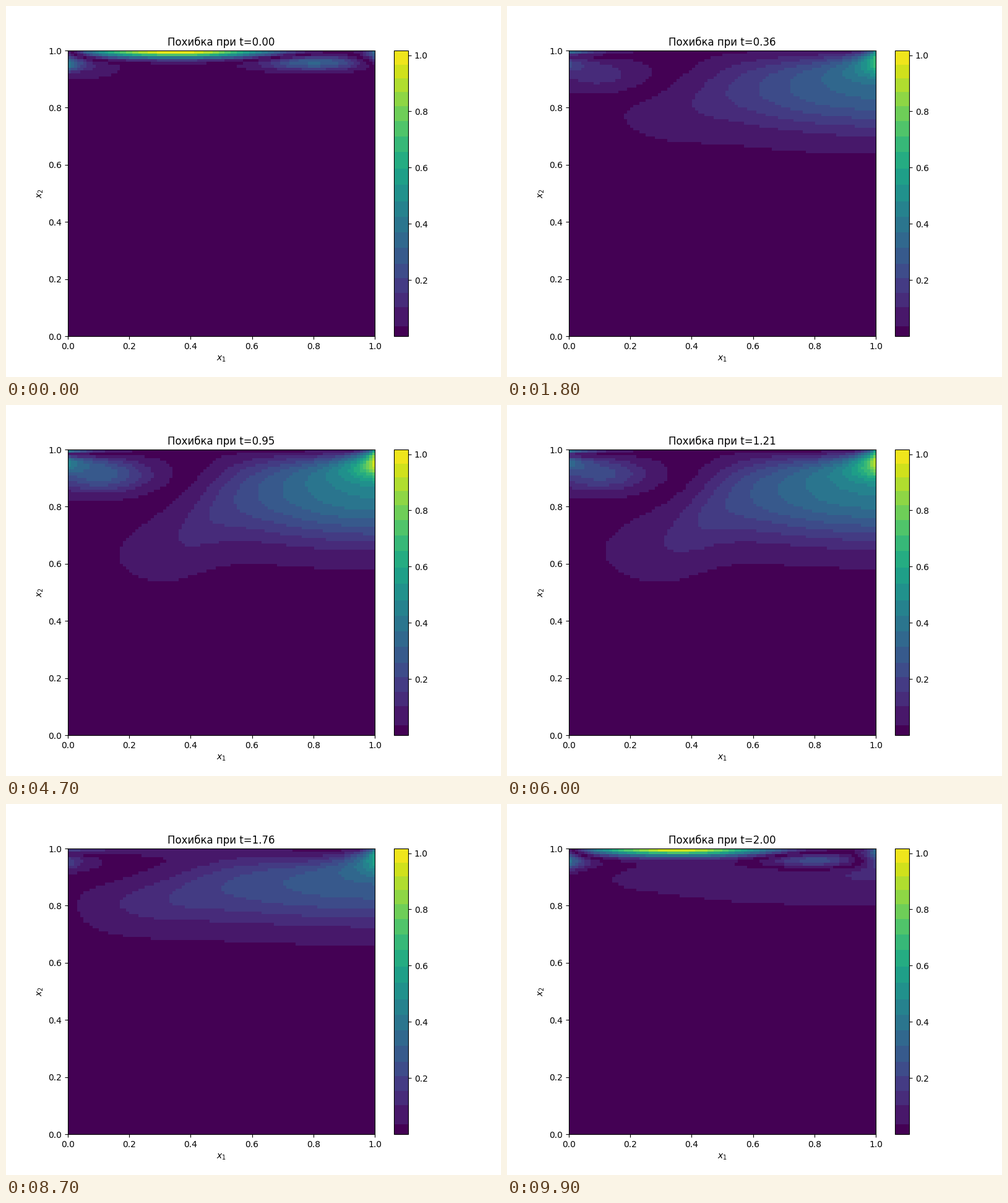
Recreate the animation shown at these times as a matplotlib script. Size 800 px wide and 600 px high, loop 10 s.

```python
import numpy as np
import matplotlib.pyplot as plt
from matplotlib.animation import FuncAnimation
from matplotlib.colors import ListedColormap

FRAMES, CELLS = 100, 100
T_END = 2.0
VMIN, VMAX = 0.0002, 1.0165

centres = (np.arange(CELLS) + .5) / CELLS
x, depth = np.meshgrid(centres, centres)   # depth runs down from x2 = 1


def bell(u, centre, width):
    return np.exp(-((u - centre) / width) ** 2)


def error(i):
    """Absolute error: a few lobes that grow and fade below the top edge."""
    t = T_END * i / (FRAMES - 1)
    swell = np.sin(np.pi * i / FRAMES) ** .35
    start, left = np.exp(-t / .04), T_END - t
    skin = np.exp(-depth / .03)

    # Broad lobe on the right with a tail that sinks towards the left
    reach = .2 + .24 * swell
    tail = 1 / (1 + np.exp((x - .42) / .07))
    spread = .5 + .6 * (t / T_END) ** 4 + .25 * np.exp(-t / .25)
    lobe = (.43 * swell ** 1.2 * bell(x, 1, spread) * np.tanh((x + .03) / .12)
            * bell(depth, .33 * reach + .23 * swell ** 4 * tail,
                   (.4 - .1 * tail) * reach)
            * (1 - (1 - np.exp(-t / .3)) * skin))

    # Peak in the right corner
    corner = ((.42 + .35 * swell ** 4) * np.exp((x - 1) / (.025 + depth))
              * bell(depth, .035 * swell, .05 + .012 * swell))

    # Thin top layer and the lobe of opposite sign under it
    layer = start + .95 * np.exp(-left / .1)
    top = 1.04 * layer * bell(x, .35, .31) * np.tanh(x / .06) * bell(depth, 0, .026)
    under = .34 * layer * bell(x, .81, .19) * bell(depth, .042, .028)

    # Left side: round blob, spot on the edge, wedge in the corner
    pulse = .31 * bell(t, .9, .6)
    ends = np.exp(-t / .06) + bell(left, 0, .25)
    blob = pulse * bell(x, .1, .175) * bell(depth, .085, .067) * (1 - skin)
    spot = (.4 * ends + 1.2 * pulse) * np.exp(-x / .06) * bell(depth, .045, .03)
    wedge = (.5 * np.sqrt(swell) * max(0, 1 - ends)
             * np.exp(-x / .09) * bell(depth, 0, .018))

    return np.abs(lobe + corner + top + wedge - under - blob - spot)


# Viridis reduced to flat colour bands of nearly equal height
u = np.linspace(0, 1, 18)
edges = np.r_[0, .033, .1 + (VMAX - .1) * u
              - .011 * np.sin(2 * np.pi * u) + .01 * np.sin(np.pi * u)]
tones = (edges[:-1] + edges[1:]) / 2 / VMAX
tones[0] = 0
levels = np.linspace(VMIN, VMAX, 256)
band = np.clip(np.searchsorted(edges, levels, side="right") - 1, 0, len(tones) - 1)
cmap = ListedColormap(plt.get_cmap("viridis")(tones)[band])

fig, ax = plt.subplots(figsize=(8, 6), dpi=100)
image = ax.imshow(error(0), cmap=cmap, vmin=VMIN, vmax=VMAX, extent=(0, 1, 0, 1),
                  aspect="auto", interpolation="nearest")
fig.colorbar(image, ax=ax)
ax.set_xlabel("$x_1$")
ax.set_ylabel("$x_2$")
title = ax.set_title("")


def draw(i):
    image.set_data(error(i))
    title.set_text(f"Похибка при t={T_END * i / (FRAMES - 1):.2f}")
    return image, title


anim = FuncAnimation(fig, draw, frames=FRAMES, interval=100, repeat=True)
plt.show()
```
